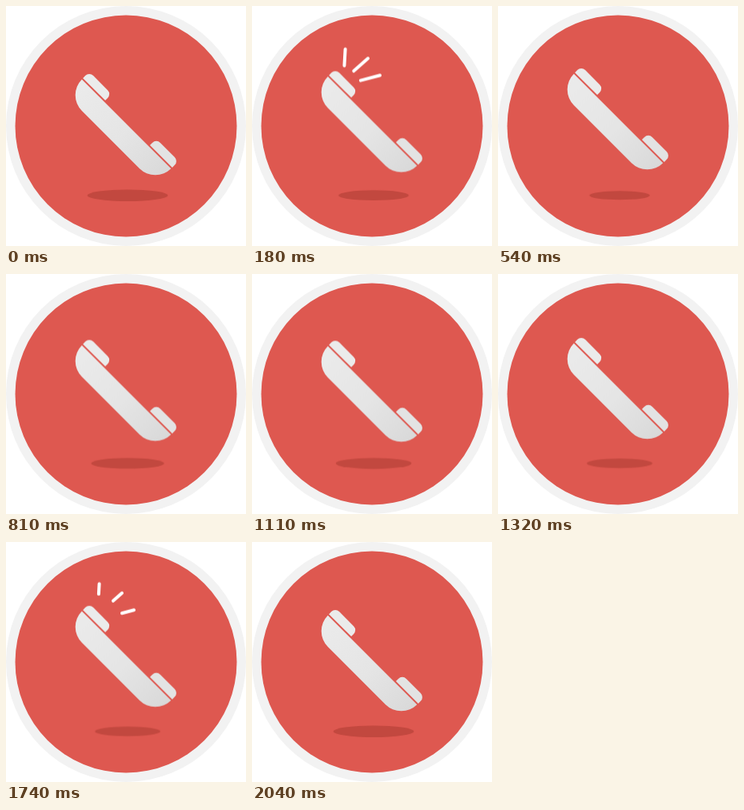
Animation of 300 by 300 pixels, one loop 2070 ms. Source, as an HTML page:

```html
<!DOCTYPE html>
<html lang="en">
<head>
<meta charset="utf-8">
<title>Ringing phone</title>
<style>
  html, body { margin: 0; width: 100%; height: 100%; overflow: hidden; background: #fff; }
  svg { display: block; width: 100vw; height: 100vh; }

  .phone { animation: lift 1035ms infinite; }
  .shadow { transform-origin: 152px 236.7px; animation: shrink 1035ms infinite; }
  .rays {
    fill: none; stroke: #fff; stroke-width: 4; stroke-linecap: round;
    stroke-dasharray: 1 1.4;
    animation: ring 2070ms linear infinite;
  }

  @keyframes lift {
    0% { transform: translateY(0); animation-timing-function: ease-out; }
    50% { transform: translateY(-7px); animation-timing-function: cubic-bezier(.5, 0, .5, 1); }
    100% { transform: translateY(0); }
  }
  @keyframes shrink {
    0% { transform: scale(1); animation-timing-function: ease-out; }
    50% { transform: scale(.75); animation-timing-function: cubic-bezier(.5, 0, .5, 1); }
    100% { transform: scale(1); }
  }
  /* Each sweep of one dash period draws the rays outwards, then erases them. */
  @keyframes ring {
    0%, 4.06% { stroke-dashoffset: 1.2; }
    13.33%, 28.7% { stroke-dashoffset: -1.2; }
    37.97%, 54.06% { stroke-dashoffset: -3.6; }
    63.33%, 77.97% { stroke-dashoffset: -6; }
    87.25%, 100% { stroke-dashoffset: -8.4; }
  }
</style>
</head>
<body>
<svg viewBox="0 0 300 300">
  <defs>
    <linearGradient id="shell" gradientUnits="userSpaceOnUse" x1="-79" y1="0" x2="79" y2="0">
      <stop offset="0" stop-color="#ebebeb"/>
      <stop offset=".55" stop-color="#e5e5e5"/>
      <stop offset="1" stop-color="#d9d9d9"/>
    </linearGradient>
    <path id="cap" d="M-79-2.8V-7.1a7 7 0 0 1 7-7H-46.5a7 7 0 0 1 7 7V-2.8Z"/>
  </defs>

  <circle cx="150" cy="150" r="150" fill="#f2f2f2"/>
  <circle cx="150" cy="150" r="138.5" fill="#de5850"/>
  <ellipse class="shadow" cx="152" cy="236.7" rx="50.3" ry="7.3" fill="#c2483f"/>

  <g class="phone">
    <g transform="translate(150 148) rotate(45)">
      <path fill="url(#shell)" d="M-78.8-.8H78.8A27.8 27.8 0 0 1 51 27H-51A27.8 27.8 0 0 1-78.8-.8Z"/>
      <use href="#cap" fill="#ebebeb"/>
      <use href="#cap" fill="#e3e3e3" transform="scale(-1 1)"/>
    </g>
    <g class="rays">
      <path pathLength="1" d="M115.4 78.5L116.6 57.4"/>
      <path pathLength="1" d="M127 85L145 69"/>
      <path pathLength="1" d="M135.5 96.7L160 90.3"/>
    </g>
  </g>
</svg>
</body>
</html>
```
